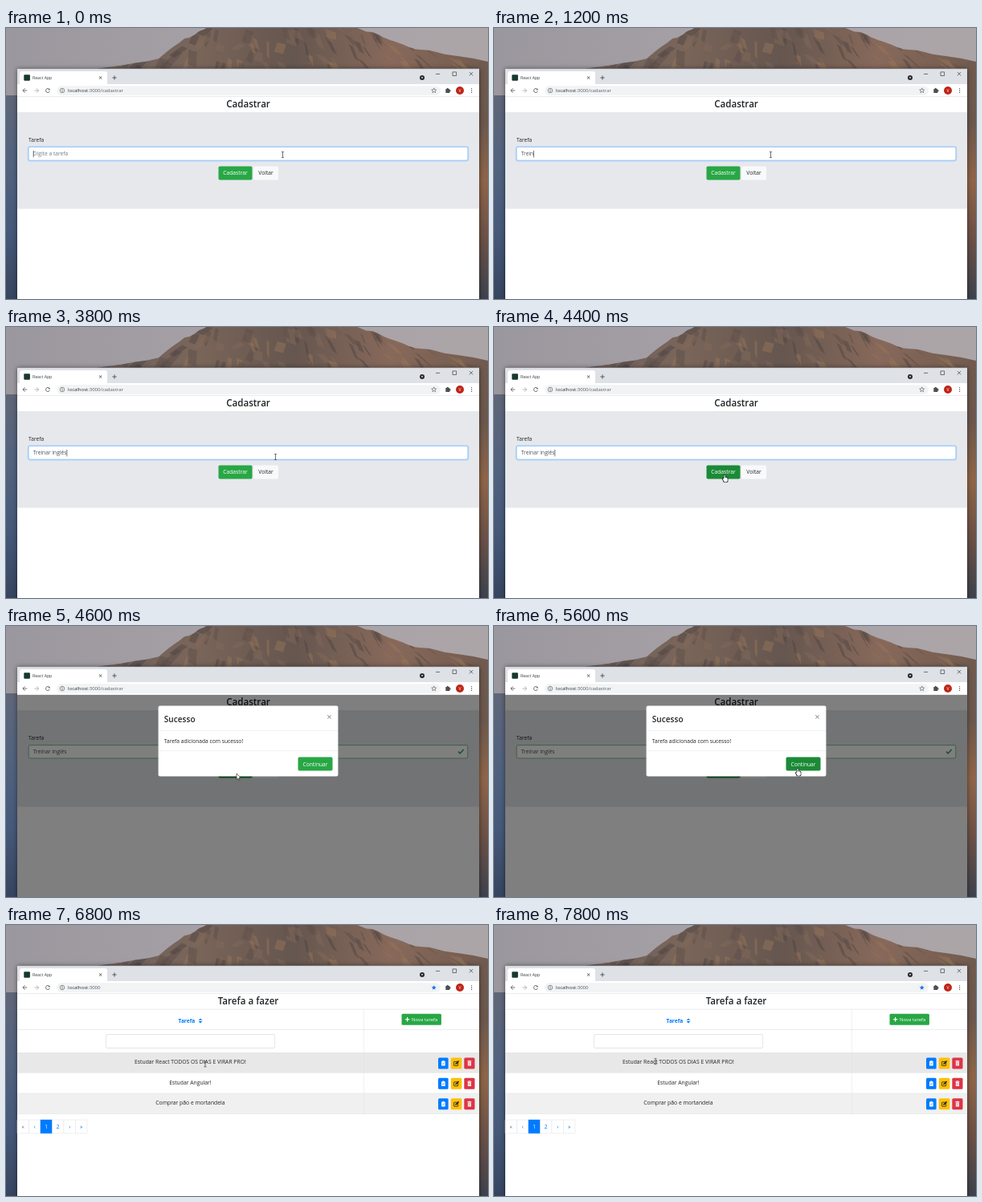
Animation, 600 px wide and 338 px high, one loop 8 s. Source, as an HTML page with a canvas:

```html
<!DOCTYPE html>
<html lang="pt">
<head>
<meta charset="utf-8">
<title>Cadastrar</title>
<style>
  html, body { margin: 0; width: 100%; height: 100%; overflow: hidden; background: #fff; }
  canvas { display: block; width: 600px; height: 338px; }
</style>
</head>
<body>
<canvas id="stage"></canvas>
<script>
const W = 600, H = 338, LOOP = 8000, STEP = 200;
const cv = document.getElementById('stage');
const c = cv.getContext('2d');
const dpr = window.devicePixelRatio || 1;
cv.width = W * dpr;
cv.height = H * dpr;

const BLUE = '#007bff', GREEN = '#28a745', GREEN_HOVER = '#1b8a36';
const INK = '#212529', RULE = '#dee2e6', ICON = '#4b4f54';
const LEFT = 14, WIDE = 575, MID = 301.5;     // browser window
const SUBMIT = [264.5, 172.5, 42, 17], CANCEL = [308, 172.5, 31, 17];
const NEXT = [363.5, 163.6, 43, 17], FIELD = [28.2, 148.6, 546.6, 16.4];

// ---------- helpers ----------
function rect(x, y, w, h, fill) {
  c.fillStyle = fill;
  c.fillRect(x, y, w, h);
}

function round(x, y, w, h, r, fill, stroke, lw = 0.5) {
  c.beginPath();
  c.roundRect(x, y, w, h, r);
  if (fill) { c.fillStyle = fill; c.fill(); }
  if (stroke) { c.strokeStyle = stroke; c.lineWidth = lw; c.stroke(); }
}

function arc(x, y, r, color, lw, from = 0, to = 7) {
  c.beginPath();
  c.arc(x, y, r, from, to);
  c.strokeStyle = color;
  c.lineWidth = lw;
  c.stroke();
}

function disc(x, y, r, fill) {
  c.beginPath();
  c.arc(x, y, r, 0, 7);
  c.fillStyle = fill;
  c.fill();
}

function trace(pts) {
  c.beginPath();
  for (let i = 0; i < pts.length; i += 2) c.lineTo(pts[i], pts[i + 1]);
}

function poly(pts, fill) {
  trace(pts);
  c.closePath();
  c.fillStyle = fill;
  c.fill();
}

function line(pts, color, lw = 0.7) {
  trace(pts);
  c.strokeStyle = color;
  c.lineWidth = lw;
  c.stroke();
}

function triangle(x, y, r, dir, fill) {
  poly([x - r, y, x + r, y, x, y + r * dir], fill);
}

function chevron(x, y, r, dir, color, lw) {
  line([x + r * dir, y - r, x, y, x + r * dir, y + r], color, lw);
}

function tick(x, y, r, color, lw) {
  line([x - r, y, x - r * 0.3, y + r * 0.7, x + r, y - r * 0.8], color, lw);
}

function cross(x, y, r, color, lw) {
  line([x - r, y - r, x + r, y + r], color, lw);
  line([x - r, y + r, x + r, y - r], color, lw);
}

function plus(x, y, r, color, lw) {
  line([x - r, y, x + r, y], color, lw);
  line([x, y - r, x, y + r], color, lw);
}

function text(s, x, y, size, color, align = 'left', weight = 400) {
  c.font = `${weight} ${size}px "Open Sans", "Noto Sans", sans-serif`;
  c.textAlign = align;
  c.fillStyle = color;
  c.fillText(s, x, y);
  return c.measureText(s).width;
}

function fade(x0, y0, x1, y1, ...stops) {
  const g = c.createLinearGradient(x0, y0, x1, y1);
  stops.forEach((s, i) => g.addColorStop(i / (stops.length - 1), s));
  return g;
}

function random(seed) {
  return () => (seed = seed * 16807 % 2147483647) / 2147483647;
}

const mix = (a, b, k) => a + (b - a) * k;

// ---------- desktop ----------
const RIDGE = [[114, 52], [190, 38], [222, 14], [252, -2], [434, -2], [470, 12], [510, 26], [600, 42]];

function mountain() {
  const rnd = random(71), outline = [];
  for (let i = 1; i < RIDGE.length; i++) {
    const [x0, y0] = RIDGE[i - 1], [x1, y1] = RIDGE[i];
    for (let k = 0; k < 1; k += 0.2) outline.push(mix(x0, x1, k), mix(y0, y1, k) + rnd() * 3 - 1.5);
  }
  c.save();
  poly([...outline, 600, 42, 600, 52, 114, 52],
    fade(114, 0, 600, 0, '#6c6160', '#7a6559', '#65564f', '#87695a', '#715b4f'));
  c.clip();
  // gullies running down and away from the summit
  const tones = ['#4a4141', '#9a7659', '#5a4c48', '#83695a'];
  c.globalAlpha = 0.45;
  for (let i = 0; i < 110; i++) {
    const x = mix(114, 600, rnd()), y = mix(-10, 46, rnd());
    const run = (x - 330) / 12 + rnd() * 16 - 8, drop = 8 + rnd() * 16, w = 3 + rnd() * 9;
    poly([x, y, x + w, y + 3, x + w + run, y + drop, x + run, y + drop * 0.8], tones[i % 4]);
  }
  c.restore();
}

function desktop() {
  rect(0, 0, W, H, fade(0, 0, W, 0, '#9b979e', '#a7a2a7', '#aca5a8'));
  rect(0, 84, LEFT, H, fade(0, 84, 0, H, '#5f6678', '#52637f', '#46597a', '#36455f'));
  mountain();
  rect(589, 42, 11, H, fade(0, 42, 0, H, '#715b4f', '#6b574d', '#8f6548', '#6b5046', '#3d424d'));
}

// ---------- browser ----------
function star(x, y, filled) {
  const pts = [];
  for (let i = 0; i <= 10; i++) {
    const a = i * Math.PI / 5 - Math.PI / 2, r = i % 2 ? 1.4 : 3.2;
    pts.push(x + r * Math.cos(a), y + r * Math.sin(a));
  }
  if (filled) poly(pts, '#1a73e8');
  else line(pts, ICON, 0.6);
}

function browser(path, starred) {
  c.save();
  c.shadowColor = 'rgba(0,0,0,.5)';
  c.shadowBlur = 6 * dpr;
  rect(LEFT, 51, WIDE, 300, '#fff');
  c.restore();
  rect(LEFT, 51, WIDE, 19, '#dee1e6');
  rect(LEFT, 50.5, WIDE, 0.6, '#8b8d92');
  round(17, 54, 109, 17, [3, 3, 0, 0], '#fff');
  rect(LEFT, 70, WIDE, 16, '#fff');
  rect(LEFT, 85.5, WIDE, 0.5, '#d5d7da');

  round(22.3, 58.2, 7.6, 7.6, 1, '#17392d');
  text('React App', 33, 64, 5.2, '#35393d');
  cross(117.6, 62, 1.7, '#3c4043', 0.8);
  plus(135, 62, 2.7, '#3c4043', 0.8);
  disc(518, 62, 3, '#26282b');
  triangle(518, 61.3, 1.4, 1.3, '#fff');
  line([535, 57.4, 540.2, 57.4], '#222', 0.6);
  round(556, 54.9, 4.6, 4.6, 0, null, '#222', 0.6);
  cross(579, 57.2, 2.2, '#222', 0.6);

  for (const [x, dir, color] of [[23.6, 1, ICON], [38, -1, '#a2a5a9']]) {
    line([x - 2.6, 78, x + 2.6, 78], color, 0.8);
    chevron(x - 2.7 * dir, 78, 2.7, dir, color, 0.8);
  }
  arc(52, 78, 2.5, ICON, 0.8, 0.3, 5.6);
  triangle(53.8, 77.3, 1.6, -1, ICON);

  round(63, 72.3, 478, 11.6, 5.8, '#f1f3f4');
  arc(70, 78, 2.8, ICON, 0.6);
  rect(69.6, 77.5, 0.8, 2.1, ICON);
  rect(69.6, 76.2, 0.8, 0.8, ICON);
  const w = text('localhost', 77, 80.1, 6, '#2b2d30');
  text(path, 77 + w, 80.1, 6, '#585c61');
  star(532.7, 78.1, starred);

  round(547.3, 76, 5, 5, 0.6, ICON);
  disc(549.7, 75.8, 1.1, ICON);
  disc(552.5, 78.4, 1.1, ICON);
  disc(565, 78, 5, '#bf2418');
  text('V', 565, 79.8, 5, '#fff', 'center');
  for (let i = -1; i < 2; i++) disc(579.6, 78 + i * 2.4, 0.65, ICON);
}

// ---------- pages ----------
function heading(s) {
  text(s, MID, 98.9, 11.6, INK, 'center', 600);
}

function button([x, y, w, h], label, fill, color = '#fff') {
  round(x, y, w, h, 1.8, fill);
  text(label, x + w / 2, y + h / 2 + 2.4, 6.7, color, 'center');
}

function formPage(value, focused, p) {
  heading('Cadastrar');
  rect(LEFT, 105, WIDE, 120.5, '#e6e8ec');
  text('Tarefa', 28, 141.7, 6.7, INK);
  if (focused) round(26.8, 147.2, 549.4, 19.2, 3, '#b5d3f5');
  round(...FIELD, 1.8, '#fff', focused ? '#80bdff' : GREEN, 0.6);
  const w = text(value || 'Digite a tarefa', 33.7, 159.4, 6.7, value ? '#495057' : '#757d85');
  if (focused) rect(33.8 + (value ? w : 0), 152.8, 0.6, 8.6, '#222');
  else tick(566.3, 156.6, 3.3, GREEN, 1.5);
  button(SUBMIT, 'Cadastrar', !focused || over(p, SUBMIT) ? GREEN_HOVER : GREEN);
  button(CANCEL, 'Voltar', '#f8f9fa', INK);
}

function modal(p) {
  rect(LEFT, 86, WIDE, H, 'rgba(0,0,0,.5)');
  round(189.6, 99.4, 223.8, 88.2, 2, '#fff');
  rect(190, 130.2, 223, 0.5, RULE);
  rect(190, 155.6, 223, 0.5, RULE);
  text('Sucesso', 196.8, 119.8, 10.1, INK, 'left', 600);
  cross(402.4, 113.4, 2.1, '#777', 1);
  text('Tarefa adicionada com sucesso!', 196.8, 145.6, 6.7, INK);
  button(NEXT, 'Continuar', over(p, NEXT) ? GREEN_HOVER : GREEN);
}

function actions(y) {
  round(538, y, 12.6, 14, 1.5, BLUE);
  round(542, y + 4.4, 4.7, 5.8, 0.6, '#fff');
  rect(543.3, y + 3.7, 2.1, 1.3, '#fff');
  tick(544.4, y + 7.4, 1.3, BLUE, 0.7);

  round(553.8, y, 13.6, 14, 1.5, '#ffc107');
  round(557.6, y + 5, 5, 5, 0.4, null, INK, 0.8);
  line([559.6, y + 8.2, 563.6, y + 4.2], INK, 1.5);

  round(570.3, y, 13.2, 14, 1.5, '#dc3545');
  rect(574.4, y + 4, 5, 0.9, '#fff');
  rect(575.9, y + 3.5, 2, 0.6, '#fff');
  round(574.8, y + 5.2, 4.2, 5, 0.5, '#fff');
  for (let i = -1; i < 2; i++) rect(576.75 + i, y + 6, 0.35, 3.4, '#dc3545');
}

function listPage() {
  heading('Tarefa a fazer');
  const tasks = ['Estudar React TODOS OS DIAS E VIRAR PRO!', 'Estudar Angular!', 'Comprar pão e mortandela'];
  const fills = ['#e9e8e9', '#fff', '#f0f0f0'];
  tasks.forEach((s, i) => {
    const y = 159 + i * 25.4;
    rect(LEFT, y, WIDE, 25.4, fills[i]);
    rect(LEFT, y, WIDE, 0.5, RULE);
    text(s, 229.4, y + 14.2, 6.8, INK, 'center');
    actions(y + 6.4);
  });
  for (const y of [104.8, 130.4, 235.2]) rect(LEFT, y, WIDE, 0.6, RULE);
  rect(445, 105, 0.5, 130.4, RULE);

  text('Tarefa', 214.6, 121.9, 6.6, BLUE, 'left', 700);
  triangle(242, 118.8, 2.4, -1, BLUE);
  triangle(242, 120.1, 2.4, 1, BLUE);
  round(492.5, 110.8, 49.4, 14, 1.5, GREEN);
  plus(499.6, 117.8, 2.7, '#fff', 1.2);
  text('Nova tarefa', 505, 120, 6, '#fff');
  round(124.6, 136.5, 210, 17, 1.8, '#fff', '#ced4da', 0.6);

  [...'«‹12›»'].forEach((s, i) => {
    const w = 14.5, x = LEFT + i * w, active = s === '1';
    round(x, 243, w, 16.8, 0, active ? BLUE : '#fff', active ? BLUE : RULE);
    text(s, x + w / 2, 253.8, 6.7, active ? '#fff' : i ? BLUE : '#5f6f86', 'center');
  });
}

// ---------- pointer ----------
const HOME = { x: 344.4, y: 158 };
const MOVES = [
  { from: 3600, to: 4400, x: 287, y: 184 },
  { from: 4800, to: 5600, x: 378, y: 177.5 },
  { from: 5800, to: 7600, x: 155, y: 170.5 },
  { from: 7600, to: 7800, x: 201, y: 170.3 }
];

function pointerAt(t) {
  let { x, y } = HOME;
  for (const m of MOVES) {
    const k = Math.min(1, Math.max(0, (t - m.from) / (m.to - m.from)));
    const e = k * k * (3 - 2 * k);
    x = mix(x, m.x, e);
    y = mix(y, m.y, e);
  }
  return { x, y };
}

function over(p, [x, y, w, h]) {
  return p.x >= x && p.x <= x + w && p.y >= y && p.y <= y + h;
}

function pointer({ x, y }, kind) {
  c.save();
  c.translate(x, y);
  c.lineJoin = 'round';
  if (kind === 'beam') {
    rect(-0.35, -3.5, 0.7, 7, '#333');
    for (const end of [-3.8, 3.2]) rect(-1.6, end, 3.2, 0.6, '#333');
  } else if (kind === 'hand') {
    // outline first, then the white inside
    for (const [grow, fill] of [[0.35, '#111'], [-0.25, '#fff']]) {
      const part = (px, py, w, h, r) => round(px - grow, py - grow, w + 2 * grow, h + 2 * grow, r, fill);
      part(-0.8, 0, 1.7, 7, 0.8);
      part(-2.6, 4.9, 2.6, 2, 0.8);
      part(-1.4, 3.6, 5.4, 5.8, 1.6);
    }
  } else {
    const pts = [0, 0, 0, 7.4, 1.7, 5.9, 2.8, 8.3, 3.9, 7.8, 2.9, 5.5, 5.1, 5.3, 0, 0];
    poly(pts, '#fff');
    line(pts, '#111', 0.6);
  }
  c.restore();
}

// ---------- timeline ----------
function typed(t) {
  const steady = Math.min(10, Math.max(0, t / STEP - 1));
  const n = steady + 2 * (t >= 2600) + (t >= 3200) + (t >= 3400);
  return 'Treinar inglês'.slice(0, n);
}

function draw(now) {
  const t = Math.floor((now % LOOP) / STEP) * STEP;
  const p = pointerAt(t);
  const listed = t >= 5800, asking = t >= 4600 && !listed;
  const hand = asking ? over(p, NEXT) : !listed && over(p, SUBMIT);
  const beam = listed ? over(p, [153, 166, 147, 9]) : !asking && over(p, FIELD);

  c.setTransform(dpr, 0, 0, dpr, 0, 0);
  desktop();
  browser(listed ? ':3000' : ':3000/cadastrar', listed);
  if (listed) listPage();
  else formPage(typed(t), !asking, p);
  if (asking) modal(p);
  pointer(p, hand ? 'hand' : beam ? 'beam' : 'arrow');
}

const start = performance.now();
function loop() {
  draw(performance.now() - start);
  requestAnimationFrame(loop);
}
loop();
</script>
</body>
</html>
```
